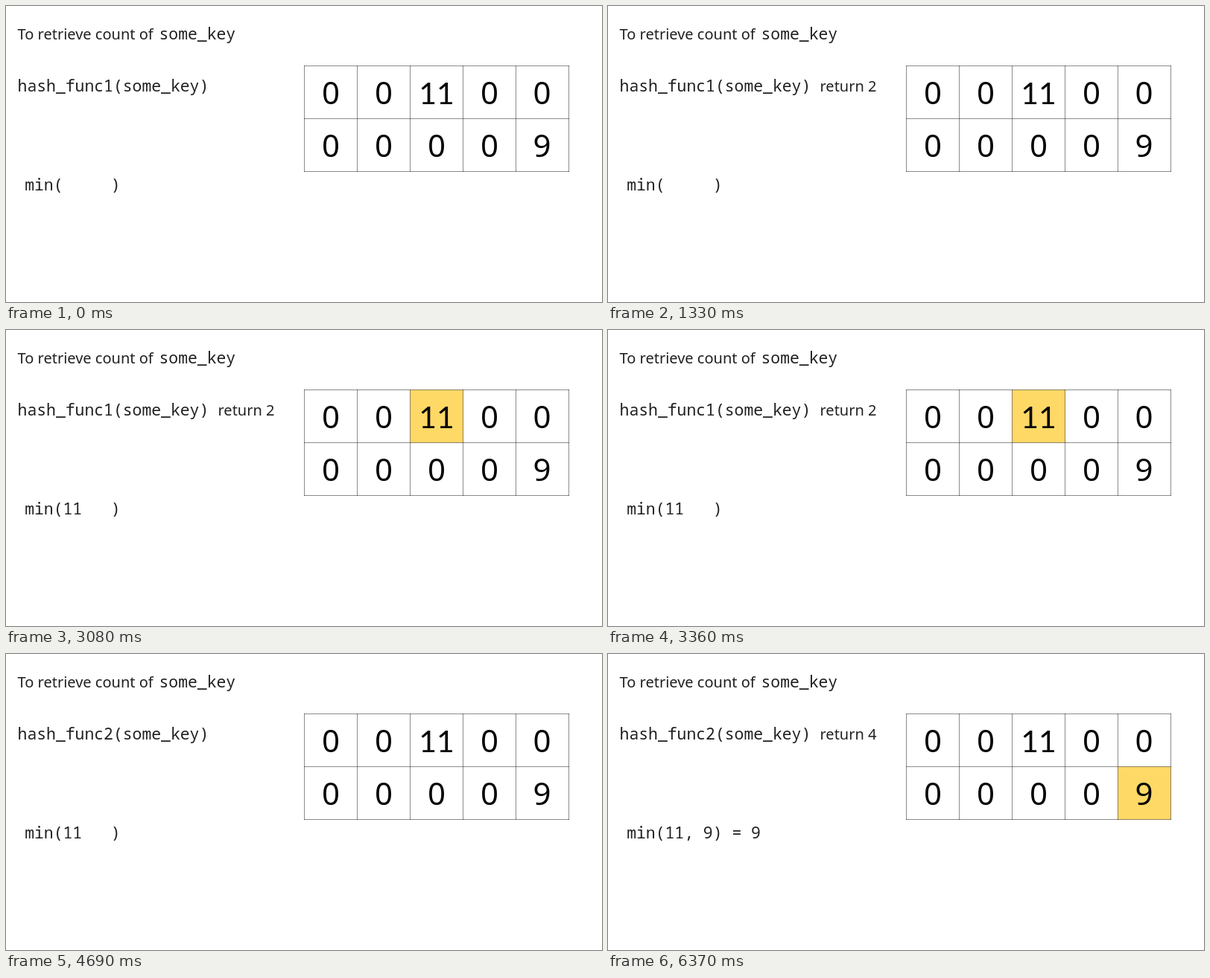
These frames come from a looping animation (800x398 px, 6860 ms). An HTML page:

```html
<!DOCTYPE html>
<html lang="en">
<head>
<meta charset="utf-8">
<title>Count lookup</title>
<style>
  html, body { margin: 0; width: 100%; height: 100%; overflow: hidden; background: #fff; }
  svg { display: block; width: 800px; height: 398px; }
  text { fill: #202020; white-space: pre; }
  .sans { font: 20px "Noto Sans", sans-serif; }
  .mono { font: 21.4px "Noto Sans Mono", monospace; }
  .cells { font: 42px "Noto Sans", sans-serif; text-anchor: middle; }
  .cells text { fill: #060606; }
  .footed { font: 41px Lato, sans-serif; }
  .grid { fill: none; stroke: #000; stroke-opacity: .45; }
  .mark { fill: #ffd966; }

  .step { visibility: hidden; animation: 6860ms step-end infinite; }
  .first { animation-name: first; }
  .return1 { animation-name: return1; }
  .mark1 { animation-name: mark1; }
  .value1 { animation-name: value1; }
  .second { animation-name: second; }
  .return2 { animation-name: return2; }
  .value2 { animation-name: value2; }
  .result { animation-name: result; }

  @keyframes first { 0% { visibility: visible } 58.163%, 100% { visibility: hidden } }
  @keyframes return1 { 0% { visibility: hidden } 16.327% { visibility: visible } 58.163%, 100% { visibility: hidden } }
  @keyframes mark1 { 0% { visibility: hidden } 26.531% { visibility: visible } 58.163%, 100% { visibility: hidden } }
  @keyframes value1 { 0% { visibility: hidden } 37.755%, 100% { visibility: visible } }
  @keyframes second { 0% { visibility: hidden } 58.163%, 100% { visibility: visible } }
  @keyframes return2 { 0% { visibility: hidden } 70.408%, 100% { visibility: visible } }
  @keyframes value2 { 0% { visibility: hidden } 81.633%, 100% { visibility: visible } }
  @keyframes result { 0% { visibility: hidden } 88.776%, 100% { visibility: visible } }
</style>
</head>
<body>
<svg viewBox="0 0 800 398">
  <text class="sans" x="15.5" y="45">To retrieve count of</text>
  <text class="mono" x="205.5" y="45">some_key</text>

  <text class="mono step first" x="15.6" y="115">hash_func1(some_key)</text>
  <text class="mono step second" x="15.6" y="115">hash_func2(some_key)</text>
  <text class="sans step return1" x="284.5" y="115">return 2</text>
  <text class="sans step return2" x="284.5" y="115">return 4</text>

  <text class="mono" x="25.2" y="248">min(     )</text>
  <text class="mono step value1" x="76.5" y="248">11</text>
  <text class="mono step value2" x="102.2" y="248">, 9</text>
  <text class="mono step result" x="166.4" y="248">= 9</text>

  <rect class="mark step mark1" x="542.5" y="80.5" width="71" height="71"/>
  <rect class="mark step return2" x="684.5" y="151.5" width="71" height="71"/>
  <path class="grid" d="M400 80.5H756M400 151.5H756M400 222.5H756M400.5 80V223M471.5 80V223M542.5 80V223M613.5 80V223M684.5 80V223M755.5 80V223"/>
  <g class="cells">
    <text y="132"><tspan x="436">0</tspan><tspan x="507">0</tspan><tspan class="footed" x="578">11</tspan><tspan x="649">0</tspan><tspan x="719.5">0</tspan></text>
    <text y="203"><tspan x="436">0</tspan><tspan x="507">0</tspan><tspan x="578">0</tspan><tspan x="649">0</tspan><tspan x="719.5">9</tspan></text>
  </g>
</svg>
</body>
</html>
```
